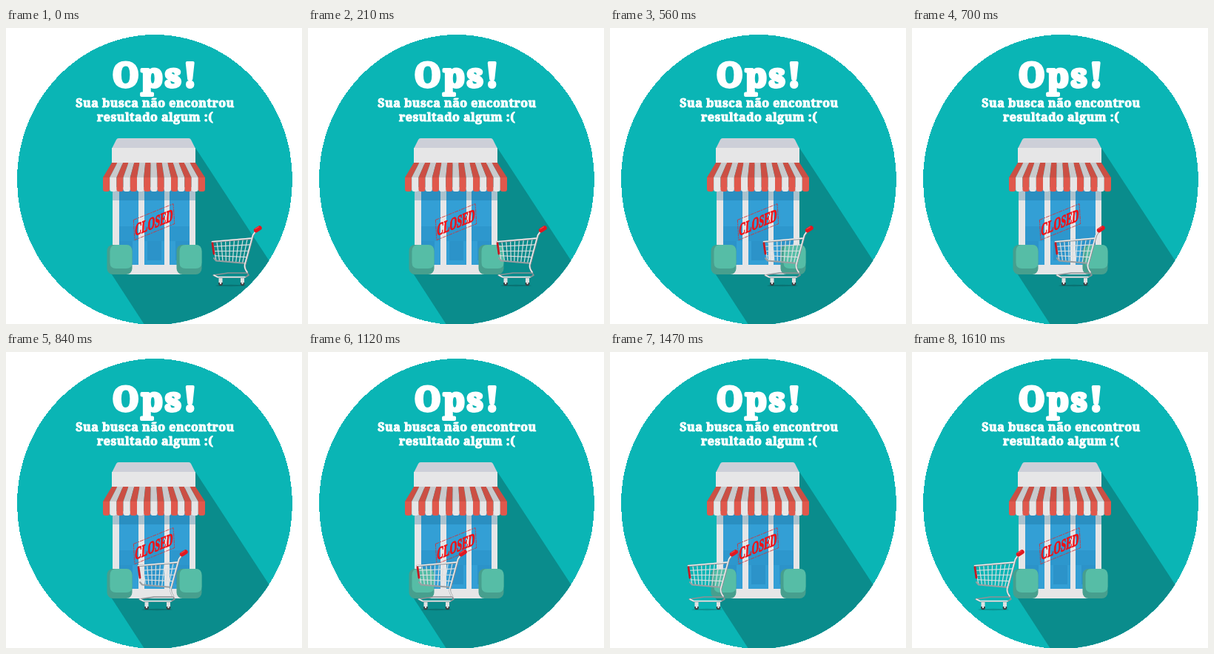
An HTML page that plays this animation: 400 px wide and 400 px high, repeating every 1.68 s.

```html
<!DOCTYPE html>
<html lang="pt">
<head>
<meta charset="utf-8">
<title>Ops!</title>
<style>
html, body { margin: 0; width: 100%; height: 100%; overflow: hidden; background: #fff; }
svg { display: block; width: 100vw; height: 100vh; }
.msg { font-family: "Noto Serif", serif; font-weight: 900; fill: #fff; stroke: #fff; stroke-linejoin: round; text-anchor: middle; }
.stamp { font: bold 13px "Liberation Serif", serif; fill: #ee1218; stroke: #ee1218; stroke-width: .55; text-anchor: middle; }
</style>
</head>
<body>
<svg viewBox="0 0 400 400">
  <defs>
    <clipPath id="disc"><ellipse cx="201" cy="205" rx="186" ry="196"/></clipPath>
    <g id="bush">
      <rect width="34" height="40" rx="8" fill="#479f8e"/>
      <path d="M4 9Q4 0 12 0H26Q34 0 34 9V24Q34 32 26 32H12Q4 32 4 24Z" fill="#56bda6"/>
    </g>
  </defs>
  <ellipse cx="201" cy="205" rx="186" ry="196" fill="#0ab5b5" shape-rendering="crispEdges"/>
  <path d="M256 162L416 407H191L141 330Z" fill="#0a8c8c" clip-path="url(#disc)"/>

  <text class="msg" x="202" y="79.5" font-size="45.5" stroke-width="4" letter-spacing="3">Ops!</text>
  <g class="msg" font-size="16" stroke-width="1.1" letter-spacing=".5">
    <text x="201.5" y="107.3">Sua busca não encontrou</text>
    <text x="201.5" y="126.3">resultado algum :(</text>
  </g>

  <g id="shop">
    <path d="M143 163L149 151Q150 149 152 149H247Q249 149 250 151L256 163Z" fill="#cdcfd8"/>
    <rect x="143" y="162" width="113" height="22" fill="#e6e6e7"/>
    <rect x="144" y="215" width="112" height="118" fill="#e6e6e7"/>
    <g id="glass"></g>
    <g id="awning"></g>
    <g transform="matrix(.96 -.39 .06 1 200 262)">
      <path d="M-28 -13.5H28V13.5H-28Z" fill="none" stroke="#d0343a" stroke-width=".8" stroke-dasharray="5 1 2 1"/>
      <g transform="skewX(-8)">
        <text class="stamp" y="4.7" transform="scale(1 1.75)">CLOSED</text>
      </g>
    </g>
    <use href="#bush" x="136.5" y="293"/>
    <use href="#bush" x="230.5" y="293"/>
  </g>

  <g id="cart" fill="none" stroke-linecap="round" stroke-linejoin="round">
    <ellipse cx="304" cy="348" rx="21" ry="1.2" fill="#000" opacity=".18"/>
    <g id="mesh" stroke="#dcdfe0" stroke-width="1.2"></g>
    <path d="M281 311L284 314.5L324 318" stroke="#9a9ea1" stroke-width="2"/>
    <path d="M278.5 289L332 284.5" stroke="#8b9094" stroke-width="2.4"/>
    <path d="M278.5 288.6L332 284" stroke="#f2f3f3" stroke-width="1.4"/>
    <path d="M280 334L300 331H326L328 334L323 337H286Z" stroke="#8d9195" stroke-width="1.6"/>
    <path d="M338 274L334 280L323 320Q322 325 326 330" stroke="#8d9195" stroke-width="2.5"/>
    <path d="M338 273.5L333.5 280L322.5 320Q322 325 326 330M281 334L286 336.5H323" stroke="#eff0f0" stroke-width="1.4"/>
    <path d="M279 291L281 305" stroke="#c61822" stroke-width="2.8"/>
    <path d="M338 273.3L342.6 270.2" stroke="#e11720" stroke-width="6.2"/>
    <path d="M337 271.5L341.5 268.8" stroke="#f2474c" stroke-width="1.2"/>
    <g id="wheels"></g>
  </g>
</svg>
<script>
const $ = id => document.getElementById(id);
const path = (d, fill = 'none') => `<path d="${d}" fill="${fill}"/>`;
const rect = (x, y, w, h, fill) => `<rect x="${x}" y="${y}" width="${w}" height="${h}" fill="${fill}"/>`;
const mix = (a, b, k) => a + (b - a) * k;

function drawGlass() {
  $('glass').innerHTML = [[153, 26], [187, 27], [221, 27]].map(([x, w], i) =>
    rect(x, 218, w, 102, '#339fd5') +
    rect(x, 268, w, 20, '#2d97cd') +
    rect(x + i * 4, 288, w - 8, 26, '#2c93c9')).join('') +
    rect(144, 220, 112, 13, 'rgba(20,100,140,.28)');
}

function drawAwning() {
  const n = 15;
  let s = '';
  for (let i = 0; i < n; i++) {
    const [a, b] = [i / n, (i + 1) / n];
    const [l, r] = [mix(131, 269, a), mix(131, 269, b)];
    const red = i % 2 === 0;
    s += path(`M${mix(143, 256, a)} 182H${mix(143, 256, b)}L${r} 202H${l}Z`, red ? '#cb4f44' : '#c9cacc');
    s += path(`M${l} 202H${r}V218Q${r} 221 ${r - 3} 221H${l + 3}Q${l} 221 ${l} 218Z`, red ? '#e0584c' : '#e6e6e7');
  }
  $('awning').innerHTML = s;
}

function drawCart() {
  let s = '';
  for (let i = 0; i <= 9; i++) {
    const k = i / 9;
    s += path(`M${mix(279, 332, k)} ${mix(289, 284.5, k)}L${mix(284, 324, k)} ${mix(314, 318, k)}`);
  }
  for (let i = 1; i < 4; i++) {
    const k = i / 4;
    s += path(`M${mix(279, 284, k)} ${mix(289, 314, k)}L${mix(332, 324, k)} ${mix(284.5, 318, k)}`);
  }
  $('mesh').innerHTML = s;
  $('wheels').innerHTML = [290, 319.5].map(x =>
    `<circle cx="${x}" cy="345.5" r="2.8" fill="#3a3d40"/>` +
    rect(x - 2.5, 338, 5, 6, '#dfe1e2') +
    `<circle cx="${x}" cy="345" r="1.2" fill="#e6e8e9"/>`).join('');
}

// [step, cart offset in px]
const keys = [[0, 0], [5, -38], [8, -71], [12, -100], [16, -131], [21, -173], [23, -194]];
const STEP = 70, LOOP = 1680;

function offset(step) {
  const i = Math.max(1, keys.findIndex(k => k[0] >= step));
  const [[s0, x0], [s1, x1]] = [keys[i - 1], keys[i]];
  return Math.round(mix(x0, x1, (step - s0) / (s1 - s0)));
}

function render(ms) {
  const step = Math.floor((ms % LOOP) / STEP);
  $('cart').setAttribute('transform', `translate(${offset(step)} 0)`);
}

drawGlass();
drawAwning();
drawCart();
render(0);
const start = performance.now();
(function tick() {
  render(performance.now() - start);
  requestAnimationFrame(tick);
})();
</script>
</body>
</html>
```
